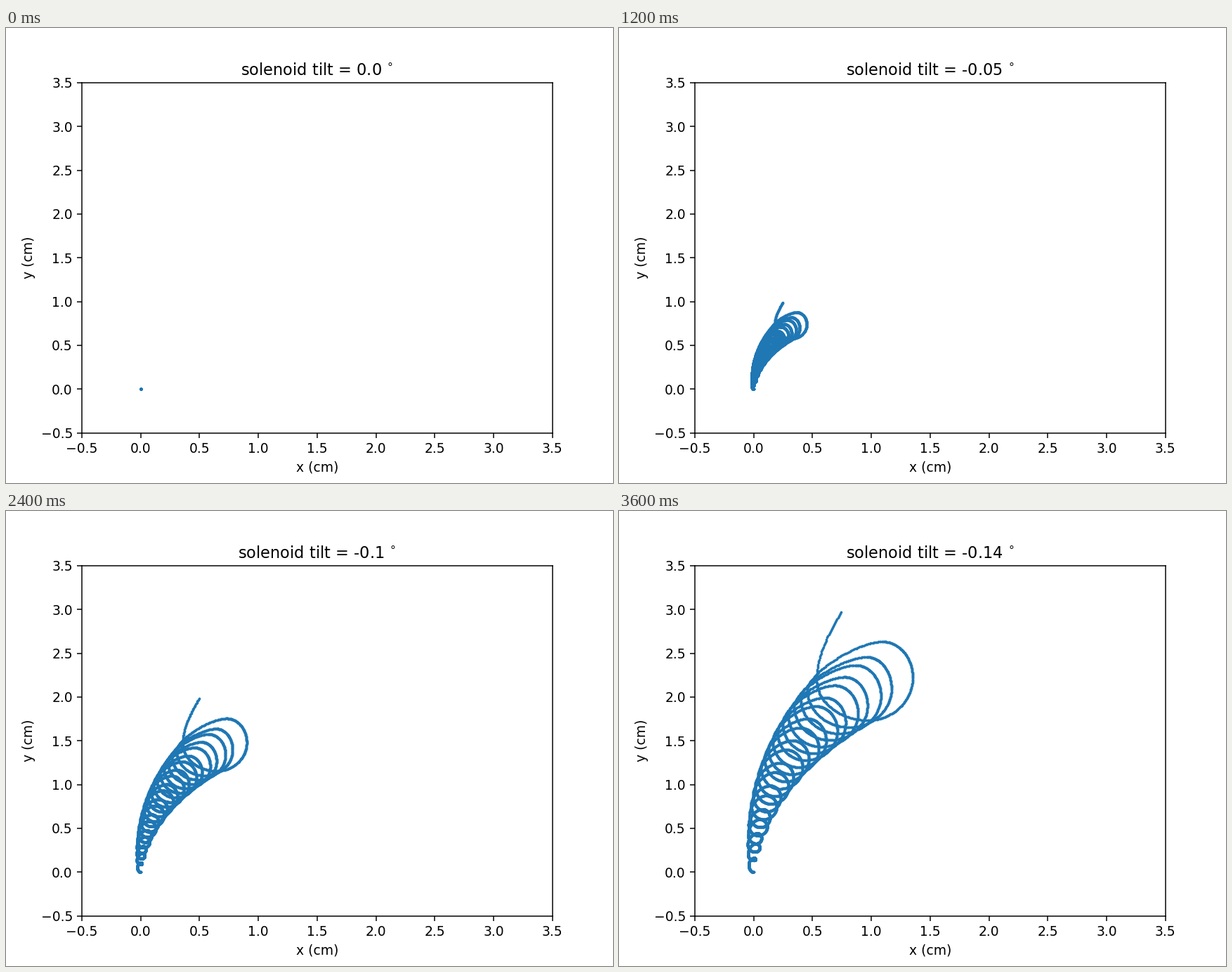
A matplotlib script for the animation above (4000 ms loop, 864 by 648 pixels).

```python
import numpy as np
import matplotlib.pyplot as plt
from matplotlib.animation import FuncAnimation

STEPS = 10
LOOPS = 20
MAX_TILT = np.degrees(0.0025)
PX_PER_CM = np.array([167.4, 124.74])


def bezier(p0, p1, p2, p3, n):
    t = np.linspace(0, 1, n, endpoint=False)[:, None]
    s = 1 - t
    return s**3 * p0 + 3 * s**2 * t * p1 + 3 * s * t**2 * p2 + t**3 * p3


def arc(p, q, flat_start, k=0.55, n=80):
    """Quarter turn from p to q, leaving horizontally or vertically."""
    corner = np.array([q[0], p[1]] if flat_start else [p[0], q[1]])
    return bezier(p, p + k * (corner - p), q + k * (corner - q), q, n)


def track(xs, ys, u, wobble=(0, 0), last=(0, 0)):
    """Extreme point of every loop: quadratic drift, alternating wobble."""
    sign = np.where(u % 2 == 1, 1, -1)
    pts = np.array([np.polyval(c[::-1], u) + w * sign
                    for c, w in zip((xs, ys), wobble)]).T
    pts[-1] += last
    return pts


def trajectory():
    """Widening clockwise gyration followed by the escaping tail, in cm."""
    u = np.arange(LOOPS)
    top = track((1.3, 1.11, 0.432), (21.65, 17.76, -0.104), u, (0, 1.3), (5, 5.5))
    right = track((3.3, 3.67, 0.395), (18.85, 15.28, -0.099), u, (1.2, 0.7), (9.5, 3))
    bottom = track((0.3, 0.72, 0.377), (16.85, 12.1, -0.087), u, (0, 0), (12, 1))
    left = track((-7.2, -1.19, 0.294), (10.5, 14.57, -0.077),
                 np.arange(LOOPS + 1), (0, 0), (3, 3))

    parts = [arc(np.zeros(2), left[0], True)]
    for j in range(LOOPS):
        parts += [
            arc(left[j], top[j], False, 0.55 - 0.011 * j),
            arc(top[j], right[j], True),
            arc(right[j], bottom[j], False),
            arc(bottom[j], left[j + 1], True),
        ]
    end = np.array([124.3, 370.3])
    start = left[-1]
    parts.append(bezier(start, start + [0, 36], end - [16, 28], end, 44))
    parts.append(end[None])
    return np.concatenate(parts) / PX_PER_CM


path = trajectory()

fig, ax = plt.subplots(figsize=(6.4, 4.8), dpi=135)
ax.set(xlim=(-0.5, 3.5), ylim=(-0.5, 3.5), xlabel="x (cm)", ylabel="y (cm)")
dots, = ax.plot([], [], ".", color="C0", markersize=2)
title = ax.set_title("")


def update(i):
    f = i / (STEPS - 1)
    dots.set_data(*(path * f).T)
    tilt = round(-MAX_TILT * f, 2) + 0.0
    title.set_text(rf"solenoid tilt = {tilt} $^{{\circ}}$")
    return dots, title


anim = FuncAnimation(fig, update, frames=STEPS, interval=400,
                     repeat=True, repeat_delay=0)
plt.show()
```
